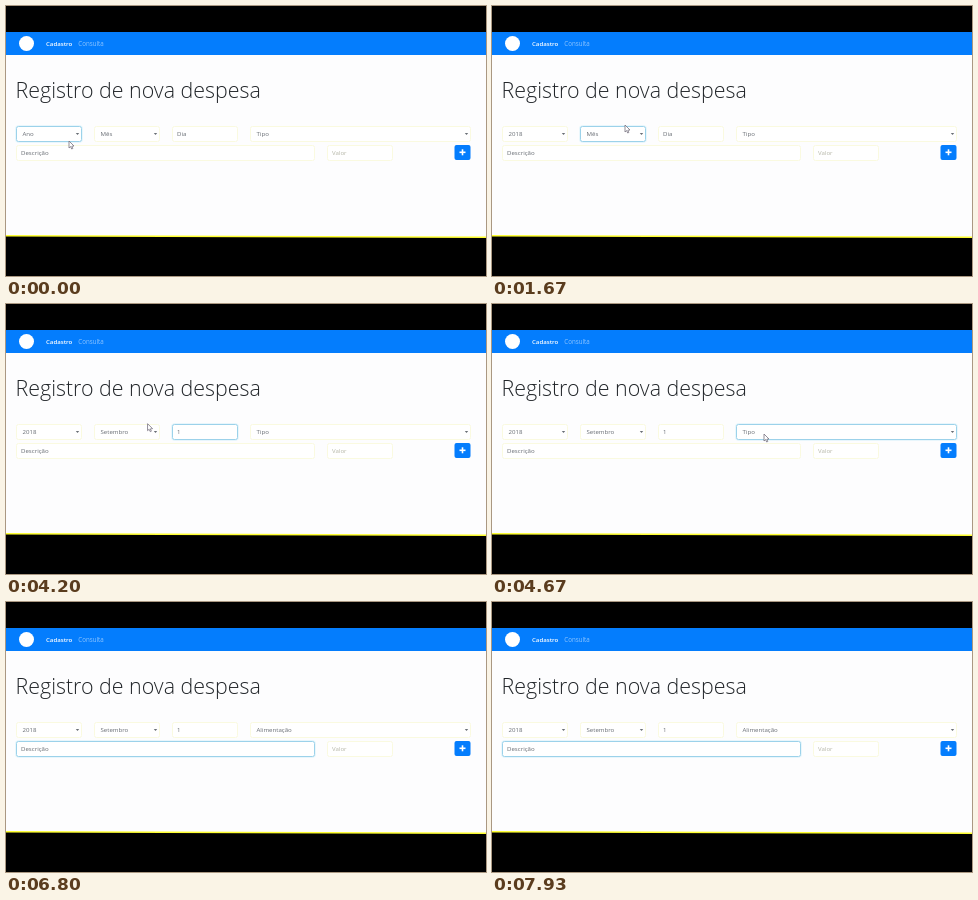
An HTML page with a canvas that plays this animation: 480 px wide and 270 px high, repeating every 8000 ms.

```html
<!DOCTYPE html>
<html lang="pt">
<head>
<meta charset="utf-8">
<title>Registro de nova despesa</title>
<style>
  html, body { margin: 0; width: 100%; height: 100%; overflow: hidden; background: #000; }
  canvas { display: block; width: 480px; height: 270px; }
</style>
</head>
<body>
<canvas width="480" height="270"></canvas>
<script>
const ctx = document.querySelector('canvas').getContext('2d');
const LOOP = 8000, BLINK = 530;
const BLUE = '#047dfd', PAGE = '#fdfdfe', TEXT = '#666b72';

// Each value list holds [start time, text]; focus is an interval in ms.
const fields = [
  { x: 10, y: 120, w: 66, select: true, focus: [0, 1530], values: [[0, 'Ano'], [1130, '2018']] },
  { x: 88, y: 120, w: 66, select: true, focus: [1530, 2800], values: [[0, 'Mês'], [2270, 'Setembro']] },
  { x: 166, y: 120, w: 66, focus: [2800, 4530], caret: [2800, 3400], values: [[0, 'Dia'], [3400, '1']] },
  { x: 244, y: 120, w: 221, select: true, focus: [4530, 6000], values: [[0, 'Tipo'], [5800, 'Alimentação']] },
  { x: 10, y: 139, w: 299, focus: [6000, LOOP], caret: [6000], values: [[0, 'Descrição']] },
  { x: 321, y: 139, w: 66, values: [[0, 'Valor']], color: '#b4b5a6' }
];

// Pointer stops: [time, x, y]
const pointerRuns = [
  [[0, 63, 135], [400, 63, 135], [1130, 48, 150], [1270, 48, 150], [1600, 133, 119], [2270, 133, 119]],
  [[4130, 133, 119], [4600, 272, 130], [5200, 272, 130], [5800, 268, 142]]
];

function text(str, x, y, size, color, weight = 400) {
  ctx.font = `${weight} ${size}px "Open Sans", "Noto Sans", sans-serif`;
  ctx.fillStyle = color;
  ctx.fillText(str, x, y);
}

function rect(x, y, w, h, color) {
  ctx.fillStyle = color;
  ctx.fillRect(x, y, w, h);
}

function polygon(points, color) {
  ctx.beginPath();
  points.forEach(([x, y]) => ctx.lineTo(x, y));
  ctx.closePath();
  ctx.fillStyle = color;
  ctx.fill();
}

function drawField(field, t) {
  const { x, y, w, select, focus, caret, values } = field;
  const focused = focus && t >= focus[0] && t < focus[1];
  ctx.beginPath();
  ctx.roundRect(x + .5, y + .5, w - 1, 15, 2);
  if (focused) {
    ctx.strokeStyle = '#e2f5fc';
    ctx.lineWidth = 2.5;
    ctx.stroke();
  }
  ctx.fillStyle = '#fff';
  ctx.fill();
  ctx.strokeStyle = focused ? '#9cd2ea' : '#fafae0';
  ctx.lineWidth = 1;
  ctx.stroke();

  const value = values.filter(([start]) => t >= start).pop()[1];
  const left = x + (select ? 6.5 : 5);
  text(value, left, y + 10, 6.1, field.color || TEXT);
  if (select) {
    const cx = x + w - 4.5, cy = y + 7;
    polygon([[cx - 1.7, cy], [cx + 1.7, cy], [cx, cy + 2]], '#6b7077');
  }
  if (focused && caret) {
    const start = caret.filter(time => t >= time).pop();
    const offset = value === '1' ? 4 : 0;
    if ((t - start) % (2 * BLINK) < BLINK) rect(left + offset, y + 4, .8, 8, '#333');
  }
}

function drawPointer(t) {
  for (const run of pointerRuns) {
    const next = run.findIndex(stop => stop[0] > t);
    if (next < 1) continue;
    const [t0, x0, y0] = run[next - 1], [t1, x1, y1] = run[next];
    const p = (t - t0) / (t1 - t0), ease = p * p * (3 - 2 * p);
    ctx.save();
    ctx.translate(x0 + (x1 - x0) * ease, y0 + (y1 - y0) * ease);
    polygon([[0, 0], [0, 7], [1.6, 5.6], [2.7, 8], [3.8, 7.5], [2.8, 5.2], [5, 5]], '#fff');
    ctx.strokeStyle = '#77717f';
    ctx.lineWidth = .8;
    ctx.stroke();
    ctx.restore();
  }
}

function draw(t) {
  rect(0, 0, 480, 270, '#000');
  polygon([[0, 26], [480, 26], [480, 232], [0, 230.5]], '#ffff30');
  polygon([[0, 26], [480, 26], [480, 230.5], [0, 229]], PAGE);
  rect(0, 26, 480, 23, BLUE);
  ctx.beginPath();
  ctx.arc(20.5, 37.5, 7.5, 0, 2 * Math.PI);
  ctx.fillStyle = '#fff';
  ctx.fill();
  text('Cadastro', 40, 39.5, 6.1, '#fff', 600);
  text('Consulta', 72.3, 39.5, 6.2, '#8fc5ff');
  text('Registro de nova despesa', 9.5, 92, 21.4, '#212529', 300);
  fields.forEach(field => drawField(field, t));

  ctx.beginPath();
  ctx.roundRect(448.5, 139, 16, 15, 2);
  ctx.fillStyle = BLUE;
  ctx.fill();
  rect(453.5, 145.5, 6, 1.6, '#fff');
  rect(455.7, 143.3, 1.6, 6, '#fff');
  drawPointer(t);
}

const began = performance.now();
function frame() {
  draw((performance.now() - began) % LOOP);
  requestAnimationFrame(frame);
}
frame();
</script>
</body>
</html>
```
